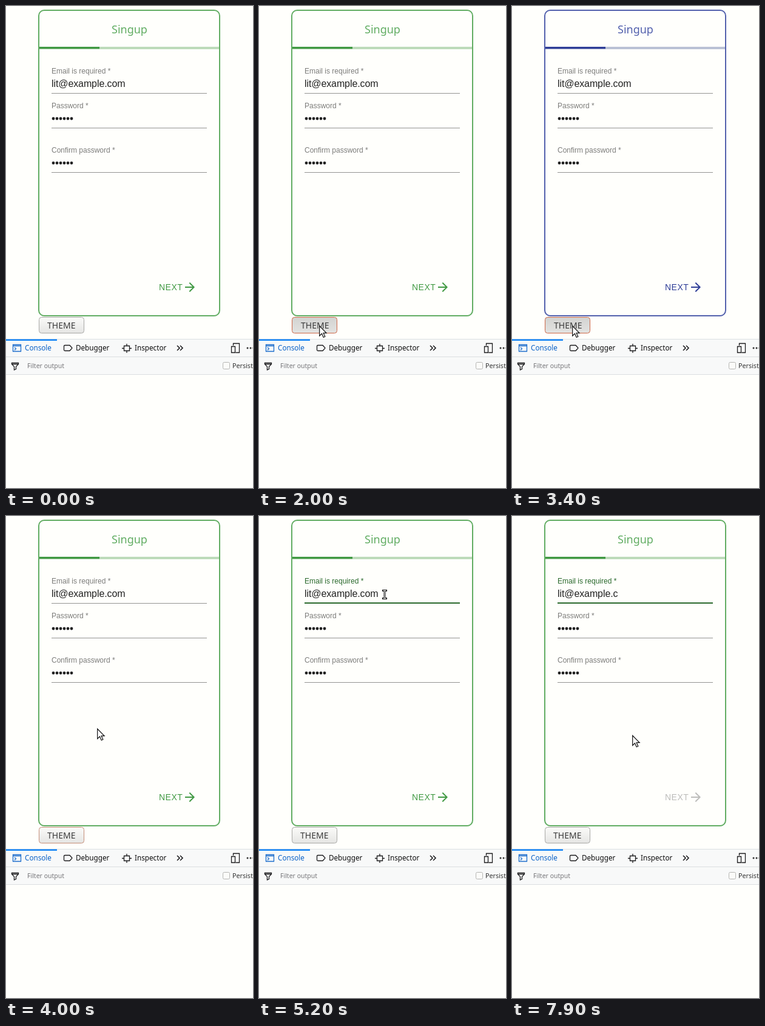
These frames come from a looping animation (407x792 px, 8 s). An HTML page:

```html
<!DOCTYPE html>
<html lang="en">
<head>
<meta charset="utf-8">
<title>Signup form</title>
<style>
  html, body { margin: 0; width: 100%; height: 100%; overflow: hidden; background: #fffffc; }
  svg { display: block; width: 407px; height: 792px; }
  text { white-space: pre; }
  .ui { font-family: "Noto Sans", "Open Sans", sans-serif; }
  .form { font-family: "Liberation Sans", Arial, sans-serif; }
  .label { font-size: 12px; fill: #7d7d7b; }
  .tab { font-size: 11.7px; fill: #0c0c0d; }
  .icon { fill: none; stroke: #1c1c1e; stroke-width: 1.3; }
</style>
</head>
<body>
<svg viewBox="0 0 407 792">
  <defs>
    <linearGradient id="up" x2="0" y2="1"><stop stop-color="#fbfbf9"/><stop offset="1" stop-color="#e5e5e3"/></linearGradient>
    <linearGradient id="over" x2="0" y2="1"><stop stop-color="#fffffd"/><stop offset="1" stop-color="#eeeeec"/></linearGradient>
    <linearGradient id="down" x2="0" y2="1"><stop stop-color="#d3d3d1"/><stop offset="1" stop-color="#e3e3e1"/></linearGradient>
  </defs>

  <!-- Card -->
  <rect id="card" x="54" y="7" width="298" height="502" rx="9" fill="none" stroke-width="2"/>
  <text id="title" class="ui" x="174" y="45" font-size="18">Singup</text>
  <rect id="track" x="55" y="67" width="296" height="4"/>
  <rect id="bar" x="55" y="67" width="99" height="3.4"/>

  <g class="form">
    <text id="emailLabel" class="label" x="75" y="111">Email is required *</text>
    <text id="email" x="75" y="133" font-size="16" letter-spacing="-.1" fill="#222"></text>
    <text class="label" x="75" y="168">Password *</text>
    <text class="label" x="75" y="241">Confirm password *</text>
    <g id="next">
      <text x="252" y="467" font-size="14" letter-spacing=".5">NEXT</text>
      <path transform="translate(291 450)" d="M12 4l-1.41 1.41L16.17 11H4v2h12.17l-5.58 5.59L12 20l8-8z"/>
    </g>
  </g>
  <g id="dots" fill="#222"></g>
  <path id="emailLine" d="M75 143.5h256"/>
  <path d="M75 200.5h256M75 273.5h256" stroke="#949492"/>
  <rect id="ripple" y="142" height="2" fill="#2a692c"/>
  <rect id="caret" y="118" width="1" height="19" fill="#111"/>

  <!-- Theme button -->
  <rect id="button" x="54.5" y="511.5" width="74" height="26" rx="4"/>
  <text id="theme" class="ui" y="530" font-size="14" fill="#3c3c3c">THEME</text>

  <!-- Developer tools -->
  <path d="M0 547h407v59H0z" fill="#f8f9f9"/>
  <path d="M0 547.5h407M0 576.5h407M0 605.5h407" stroke="#dcdfe1"/>
  <path d="M0 547.5h84v2.5H0z" fill="#1484f5"/>
  <g class="ui">
    <text class="tab" x="31" y="566" style="fill:#0b62c6">Console</text>
    <text class="tab" x="115" y="566">Debugger</text>
    <text class="tab" x="212" y="566">Inspector</text>
    <text x="35" y="595" font-size="10.5" fill="#77777a">Filter output</text>
    <text x="373" y="595" font-size="10.7" fill="#333">Persist</text>
  </g>
  <g class="icon">
    <path d="M11.5 556.5h13v11h-13zM11.5 558.5h13M14 561l2.5 2.2-2.5 2.2" style="stroke:#1a6ccc"/>
    <path d="M97 557.5h8l4 4.5-4 4.5h-8q-1.5 0-1.5-1.5v-6q0-1.5 1.5-1.5z"/>
    <path d="M194.5 558.5h9v8h-9zM199 555v3M199 567v3M191 562.500h3M204 562.500h3"/>
    <path d="M282 558l4 4-4 4M287 558l4 4-4 4" stroke-width="1.6"/>
    <path d="M374.500 558v-3.500h10v15h-6M371.500 559.500h6v10h-6z"/>
    <path d="M9.500 586.500h11v2l-4 4v4l-3 1.500v-5.500l-4-4zM10 588.500h10"/>
    <rect x="357.500" y="585.500" width="11" height="11" rx="2" style="fill:#fbfbf9;stroke:#b5b5b3;stroke-width:1"/>
  </g>
  <path d="M398 562h.01M403 562h.01M408 562h.01" stroke="#333" stroke-width="3" stroke-linecap="round"/>

  <!-- Pointers -->
  <path id="arrow" d="M.7.8v16.200l3.800-3.700 2.700 6.200 2.600-1.200-2.700-6h5z" fill="#fff" stroke="#111" stroke-width="1.2"/>
  <g id="beam" fill="none">
    <path d="M-4-6.500h8M0-6.500v13M-4 6.500h8" stroke="#111" stroke-width="3"/>
    <path d="M-2.700-6.500h5.400M0-6.500v13M-2.700 6.500h5.400" stroke="#fff"/>
  </g>
</svg>

<script>
const LOOP = 8000, STEP = 100;
const EMAIL = "lit@example.com";
const GREEN = { main: "#62ad63", strong: "#429a44", track: "#bddbba" };
const INDIGO = { main: "#5361ad", strong: "#303f98", track: "#bac1d5" };
const BEAM = "beam", ARROW = "arrow";

// Pointer stops: start time, x, y, shape
const pointerStops = [
  [700, 219, 587, ARROW], [800, 130, 562, ARROW], [900, 29, 540, ARROW],
  [1000, 66, 517, ARROW], [1100, 104, 531, ARROW], [1300, 101, 528, ARROW],
  [1400, 99, 525, ARROW], [4000, 150, 349, ARROW], [4200, 168, 290, ARROW],
  [4300, 192, 195, ARROW], [4400, 204, 133, BEAM], [4500, 207, 129, BEAM],
  [7700, 200, 200, ARROW], [7800, 199, 310, ARROW], [7900, 198, 360, ARROW]
];

const $ = id => document.getElementById(id);
const set = (id, attrs) => {
  for (const [name, value] of Object.entries(attrs)) $(id).setAttribute(name, value);
};
const show = (id, visible) => set(id, { visibility: visible ? "visible" : "hidden" });
const clamp = v => Math.max(0, Math.min(1, v));
const mix = (a, b, k) => `rgb(${a.map((v, i) => Math.round(v + (b[i] - v) * k))})`;

for (const y of [185, 258])
  for (let i = 0; i < 6; i++)
    $("dots").innerHTML += `<circle cx="${78 + 6 * i}" cy="${y}" r="2.4"/>`;

function drawPointer(t) {
  const stop = pointerStops.filter(([start]) => start <= t).pop();
  for (const shape of [ARROW, BEAM]) show(shape, stop && stop[3] === shape);
  if (stop) set(stop[3], { transform: `translate(${stop[1]} ${stop[2]})` });
}

function drawTheme(t) {
  const theme = t >= 2100 && t < 4000 ? INDIGO : GREEN;
  set("card", { stroke: theme.main });
  set("title", { fill: theme.main });
  set("track", { fill: theme.track });
  set("bar", { fill: theme.strong });
  set("next", { fill: t >= 6200 ? "#bdbdbb" : theme.strong });
}

function drawButton(t) {
  const pressed = t >= 2000 && t < 2100 || t >= 3400 && t < 4000;
  const hovered = t >= 1000 && t < 4000;
  const focused = t >= 2000 && t < 4700;
  set("button", {
    fill: `url(#${pressed ? "down" : hovered ? "over" : "up"})`,
    stroke: pressed ? "#cd6848" : focused ? "#c58e78" : "#a8a8a5"
  });
  set("theme", { x: pressed ? 69 : 68 });
}

function drawEmail(t) {
  const removed = t >= 6200 ? 2 : t >= 6000 ? 1 : 0;
  $("email").textContent = EMAIL.slice(0, EMAIL.length - removed);
  show("caret", t >= 4700 && t < 5200 || t >= 5900 && t < 7500);
  set("caret", { x: [196, 183, 174][removed] });

  const width = 256 * (1 - (1 - clamp((t - 4650) / 350)) ** 3);
  set("ripple", { x: 203 - width / 2, width });
  set("emailLine", { stroke: t >= 4400 ? "#222" : "#949492" });
  $("emailLabel").style.fill = mix([125, 125, 123], [42, 105, 44], clamp((t - 4700) / 300));
}

function frame(now) {
  const t = Math.floor(now % LOOP / STEP) * STEP;
  drawTheme(t);
  drawButton(t);
  drawEmail(t);
  drawPointer(t);
  requestAnimationFrame(frame);
}
frame(performance.now());
</script>
</body>
</html>
```
